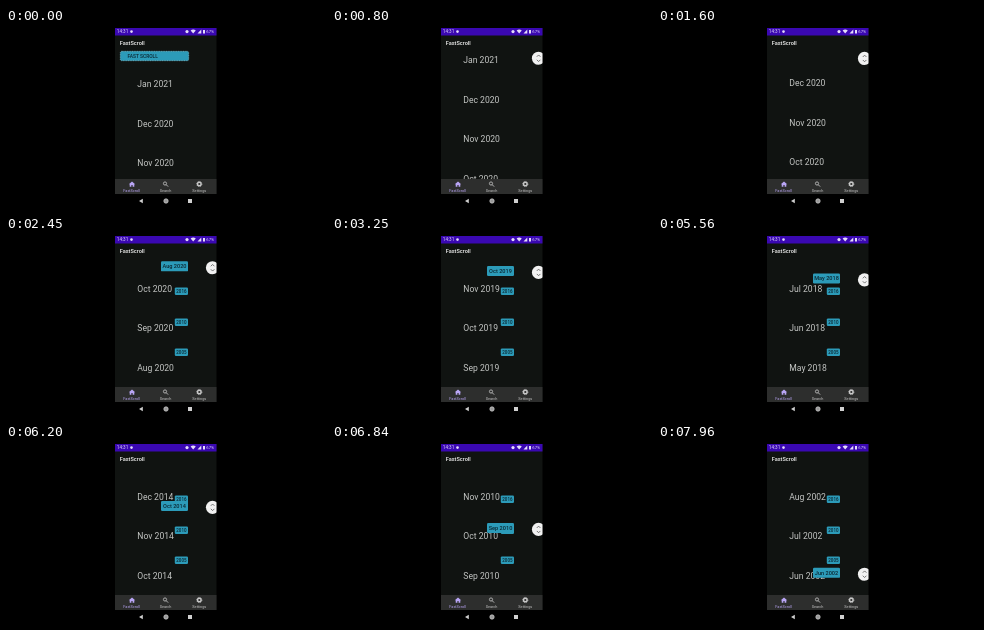
Write an HTML page that moves like this. It is 320 px wide and 180 px high and loops after 8000 ms.

```html
<!DOCTYPE html>
<html lang="en">
<head>
<meta charset="utf-8">
<title>FastScroll</title>
<style>
  html, body { margin: 0; width: 100%; height: 100%; overflow: hidden; background: #000; }
  svg { display: block; width: 100vw; height: 100vh; font-family: Roboto, "Noto Sans", sans-serif; }
  .row { font-size: 8.6px; fill: #c4c6c4; }
  .chip { fill: #2c9bb9; }
  .dark { fill: #0b2833; font-weight: 500; }
  .mid { text-anchor: middle; }
  .tab { font-size: 3.8px; fill: #c8c8c8; text-anchor: middle; }
  .tab.on { fill: #b9a5f5; }
  .status { font-size: 4.6px; fill: #e4dcfa; }
</style>
</head>
<body>
<svg viewBox="0 0 320 180">
  <defs>
    <clipPath id="listArea"><rect x="109" y="22" width="101.5" height="129"/></clipPath>
    <clipPath id="screen"><rect x="109" y="0" width="101.5" height="166"/></clipPath>
  </defs>
  <rect width="320" height="180"/>
  <rect x="109" width="101.5" height="166" fill="#101311"/>

  <g clip-path="url(#listArea)">
    <g id="bar">
      <rect class="chip" x="114.3" y="23.3" width="68.4" height="9.4" rx="1.5" stroke="#8fcbd9" stroke-width=".6" stroke-dasharray="1 .7"/>
      <text class="dark" x="121.5" y="29.9" font-size="4.9">FAST SCROLL</text>
    </g>
    <g id="rows"></g>
  </g>

  <g id="marks"></g>
  <g id="popup">
    <rect class="chip" x="155" y="-5" width="27" height="10" rx="1.2"/>
    <text class="dark mid" id="popupText" x="168.5" y="2" font-size="5.6"></text>
  </g>
  <g clip-path="url(#screen)">
    <g id="thumb">
      <circle cx="206.5" r="6.6" fill="#f1f1f1"/>
      <path d="M204.8 -1.5l1.8 -1.8 1.8 1.8M204.8 1.5l1.8 1.8 1.8 -1.8" fill="none" stroke="#666" stroke-width=".9"/>
    </g>
  </g>

  <rect x="109" width="101.5" height="7.5" fill="#3a08b2"/>
  <g class="status">
    <text x="110.8" y="5.2">14:31</text>
    <circle cx="125.5" cy="3.6" r="1.3"/>
    <circle cx="181" cy="3.6" r="1.6"/>
    <path d="M184.6 2.4q2.6 -2 5.2 0l-2.6 3.2zM191.5 5.4h3.8v-3.8zM197 2h2v3.6h-2z"/>
    <text x="200.3" y="5.2" font-size="4.2">67%</text>
  </g>
  <text x="113.7" y="17" font-size="5.6" font-weight="500" fill="#f2f2f2">FastScroll</text>

  <rect x="109" y="151" width="101.5" height="15" fill="#2d2e2d"/>
  <path d="M122.8 156.3l3.2 -2.9 3.2 2.9h-.9v2.5h-1.7v-1.8h-1.2v1.8h-1.7v-2.5z" fill="#b9a5f5"/>
  <g fill="none" stroke="#c8c8c8">
    <circle cx="159" cy="155.5" r="1.6" stroke-width=".8"/>
    <path d="M160.2 156.7l1.9 1.9" stroke-width=".9"/>
    <circle cx="193.3" cy="156" r="1.8" stroke-width="1.4"/>
    <circle cx="193.3" cy="156" r="2.6" stroke-width=".8" stroke-dasharray="1 1.04"/>
  </g>
  <text class="tab on" x="125.7" y="163.6">FastScroll</text>
  <text class="tab" x="159.5" y="163.6">Search</text>
  <text class="tab" x="193.3" y="163.6">Settings</text>

  <path d="M133 173l3.8 -2.3v4.6z" fill="#d0d0d0"/>
  <circle cx="160" cy="173" r="2.2" fill="#999" stroke="#d0d0d0" stroke-width=".7"/>
  <rect x="182" y="171" width="4" height="4" fill="#d0d0d0"/>
</svg>
<script>
const LOOP = 8000, ROW = 39.5, DRAG = 1920;
const MONTHS = "Jan Feb Mar Apr May Jun Jul Aug Sep Oct Nov Dec".split(" ");
const $ = id => document.getElementById(id);

const ticks = [[0, 11], [1920, 4], [2610, 1], [2930, 3], [3440, 3],
  [3950, 1], [4140, 1], [4400, 5], [5400, 17]]
  .flatMap(([start, n]) => Array.from({ length: n }, (_, i) => start + i * 160));

// Drag position in months back from Jan 2021: [time, months].
const drag = [[1920, 1], [2240, 1.3], [2610, 7.2], [2930, 9], [3250, 14.2], [3950, 32],
  [4140, 36.5], [4400, 39.5], [5040, 29.5], [5400, 29.5], [5560, 30.5], [5720, 37],
  [6840, 122.5], [7960, 221.5], [8000, 224]];

function dragAt(t) {
  const i = Math.max(1, drag.findIndex(k => k[0] >= t));
  const [t0, a] = drag[i - 1], [t1, b] = drag[i];
  return a + (b - a) * (t - t0) / (t1 - t0);
}

function label(back) {
  const m = 2021 * 12 - back;
  return MONTHS[m % 12] + " " + Math.floor(m / 12);
}

function add(parent, tag, attrs, text = "") {
  const el = document.createElementNS("http://www.w3.org/2000/svg", tag);
  for (const k in attrs) el.setAttribute(k, attrs[k]);
  el.textContent = text;
  return parent.appendChild(el);
}

const rows = Array.from({ length: 5 }, () => add($("rows"), "text", { class: "row", x: 131.3 }));
[[55.2, 2016], [86.2, 2010], [116.2, 2005]].forEach(([y, year]) => {
  add($("marks"), "rect", { class: "chip", x: 168.8, y: y - 3.8, width: 13.2, height: 7.6, rx: 1.2 });
  add($("marks"), "text", { class: "dark mid", x: 175.4, y: y + 1.6, "font-size": 4.5 }, year);
});

const moveY = (id, y) => $(id).setAttribute("transform", `translate(0 ${y})`);

function draw(t) {
  const dragging = t >= DRAG;
  const u = Math.min(1, Math.max(0, t / 1440));
  const scroll = 40.5 * u * u * (3 - 2 * u);
  const pos = dragging ? dragAt(t) : scroll / ROW;
  const shift = dragging ? Math.floor(pos) * ROW + 3.5 : scroll;
  const first = Math.max(0, Math.floor(shift / ROW) - 1);

  rows.forEach((el, i) => {
    el.setAttribute("y", 59.1 + (first + i) * ROW - shift);
    el.textContent = label(first + i);
  });
  moveY("bar", -shift);

  const y = 30 + 0.4525 * pos;
  moveY("thumb", y);
  $("thumb").setAttribute("opacity", Math.min(1, t / 320));
  moveY("popup", y - 1.4);
  $("popupText").textContent = label(Math.floor(pos + 1.6));
  for (const id of ["popup", "marks"]) $(id).setAttribute("visibility", t > DRAG ? "visible" : "hidden");
}

const begin = performance.now();
function frame() {
  const t = (performance.now() - begin) % LOOP;
  draw(ticks.filter(k => k <= t).pop() || 0);
  requestAnimationFrame(frame);
}
frame();
</script>
</body>
</html>
```
